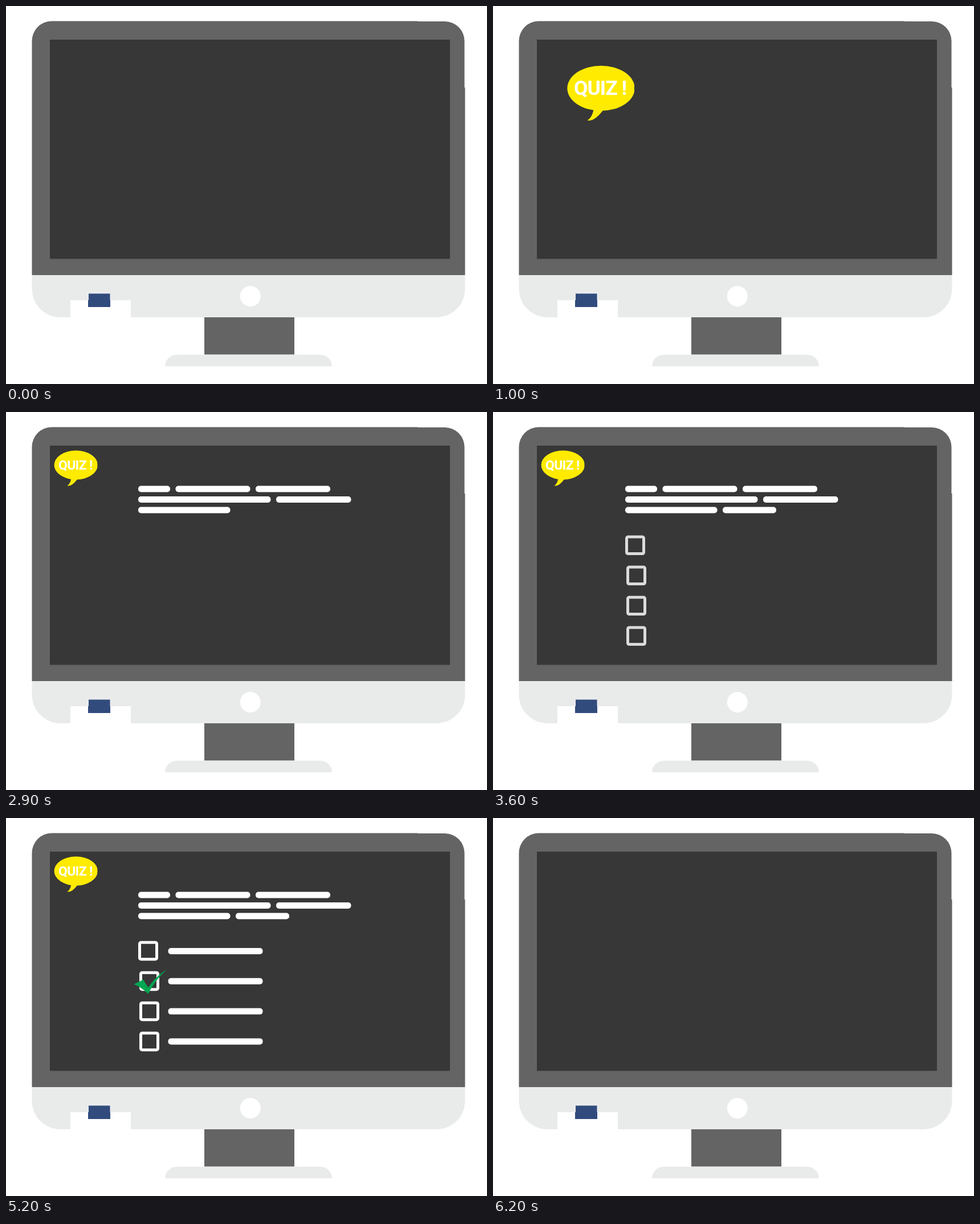
Recreate the animation shown at these times as an HTML page. Size 844 by 663 pixels, loop 7.2 s.

```html
<!DOCTYPE html>
<html lang="en">
<head>
<meta charset="utf-8">
<title>Quiz</title>
<style>
html, body { margin: 0; width: 100%; height: 100%; overflow: hidden; background: #fff; }
svg { display: block; width: 844px; height: 663px; }
text { font: bold 35px Roboto, Inter, sans-serif; letter-spacing: -1px; fill: #fff; }
#boxes rect { fill: none; stroke: #fff; stroke-width: 5; }
</style>
</head>
<body>
<svg viewBox="0 0 844 663">
  <defs>
    <path id="tick" fill="#00a651" d="M292 278L367 241L409 306Q468 214 561 157Q468 240 408 357Q350 300 292 278Z"/>
    <clipPath id="smallClip"><rect id="smallWipe" x="292" y="150" height="215"/></clipPath>
    <clipPath id="bigClip"><rect id="bigWipe" x="292" y="150" height="215"/></clipPath>
    <clipPath id="bubbleClip"><rect x="-2" y="-2" width="118" height="100"/></clipPath>
  </defs>

  <path fill="#646464" d="M45.5 472V62A35 35 0 0 1 80 26.5H722V27H770A34.5 34.5 0 0 1 804.5 62V143H805.5V472Z"/>
  <path fill="#373737" d="M77 59H779V443.5H77Z"/>
  <path fill="#e9ebeb" d="M45.5 472H805.5V496A50 50 0 0 1 755.5 546H95.5A50 50 0 0 1 45.5 496Z"/>
  <path fill="#fff" d="M113 516H219V547H113Z"/>
  <path fill="#324b7d" d="M145 504.5H182.5V516H183V528H144V516H145Z"/>
  <circle cx="428.8" cy="509" r="18" fill="#fff"/>
  <path fill="#646464" d="M348 546H506V611.5H348Z"/>
  <path fill="#e9ebeb" d="M279 632A21 20.5 0 0 1 300 611.5H551A21 20.5 0 0 1 572 632Z"/>

  <g id="show">
    <g id="bubble">
      <g clip-path="url(#bubbleClip)" fill="#ffeb00">
        <ellipse cx="58.4" cy="39" rx="58.4" ry="39"/>
        <path d="M46 73Q44 89 35 94.5Q47 97 62 77Z"/>
      </g>
      <text x="11.5" y="51">QUIZ !</text>
    </g>
    <g id="quiz">
      <g id="bars" fill="#fff"></g>
      <g id="boxes"></g>
      <g transform="translate(161.7 231.7) scale(.215)"><use href="#tick" clip-path="url(#smallClip)"/></g>
    </g>
    <use href="#tick" clip-path="url(#bigClip)"/>
  </g>
</svg>
<script>
const LOOP = 7200, STEP = 100;
const $ = id => document.getElementById(id);
const set = (el, attrs) => { for (const k in attrs) el.setAttribute(k, attrs[k]); return el; };
const addRect = (parent, attrs) =>
  parent.appendChild(set(document.createElementNS('http://www.w3.org/2000/svg', 'rect'), attrs));
const progress = (t, start, length = 300) => Math.min(1, Math.max(0, (t - start) / length));
const mix = (a, b, p) => a + (b - a) * p;

const bars = [];
const addBar = (x, y, width, start) =>
  bars.push({ el: addRect($('bars'), { x, y, height: 11, rx: 5 }), width, start });

// The question: word widths per line, written one word after another
const words = [[56, 131, 131], [232.5, 131.5], [161.5, 94]];
words.forEach((line, row) => {
  let x = 232;
  for (const width of line) {
    addBar(x, 129.5 + 18.5 * row, width, 1020 + 314 * bars.length);
    x += width + 9.5;
  }
});

// The four answers
for (let i = 0; i < 4; i++) {
  addBar(284.5, 228 + 52.8 * i, 166, 3700 + 300 * i);
  addRect($('boxes'), { x: i ? 236.5 : 234.5, y: 218.2 + 53 * i, width: 30, height: 29.5, rx: 2.5 });
}

function placeBubble(t) {
  const grow = progress(t, 275), left = 1 - progress(t, 775);
  const size = mix(0.655, 2.09, left);
  const x = mix(84.5, 304, left ** 1.13) + (1 - grow) * 121;
  const y = mix(67.5, 152, left ** 0.59) + (1 - grow) * 99;
  set($('bubble'), {
    transform: `translate(${x} ${y}) scale(${size * grow})`,
    visibility: grow ? 'visible' : 'hidden'
  });
}

function draw(t) {
  placeBubble(t);
  for (const b of bars) set(b.el, { width: b.width * progress(t, b.start) });

  const rise = progress(t, 3205, 480);
  set($('boxes'), { opacity: rise, transform: `translate(0 ${12 * (1 - rise) ** 1.5})` });

  set($('smallWipe'), { width: 270 * progress(t, 4900) });
  set($('quiz'), { visibility: t < 5400 ? 'visible' : 'hidden' });
  set($('bigWipe'), { width: 270 * progress(t, 5475) });
  set($('show'), { opacity: 1 - progress(t, 5910, 280) });
}

const begin = performance.now();
function tick() {
  const t = (performance.now() - begin) % LOOP;
  draw(Math.floor(t / STEP) * STEP);
  requestAnimationFrame(tick);
}
tick();
</script>
</body>
</html>
```
